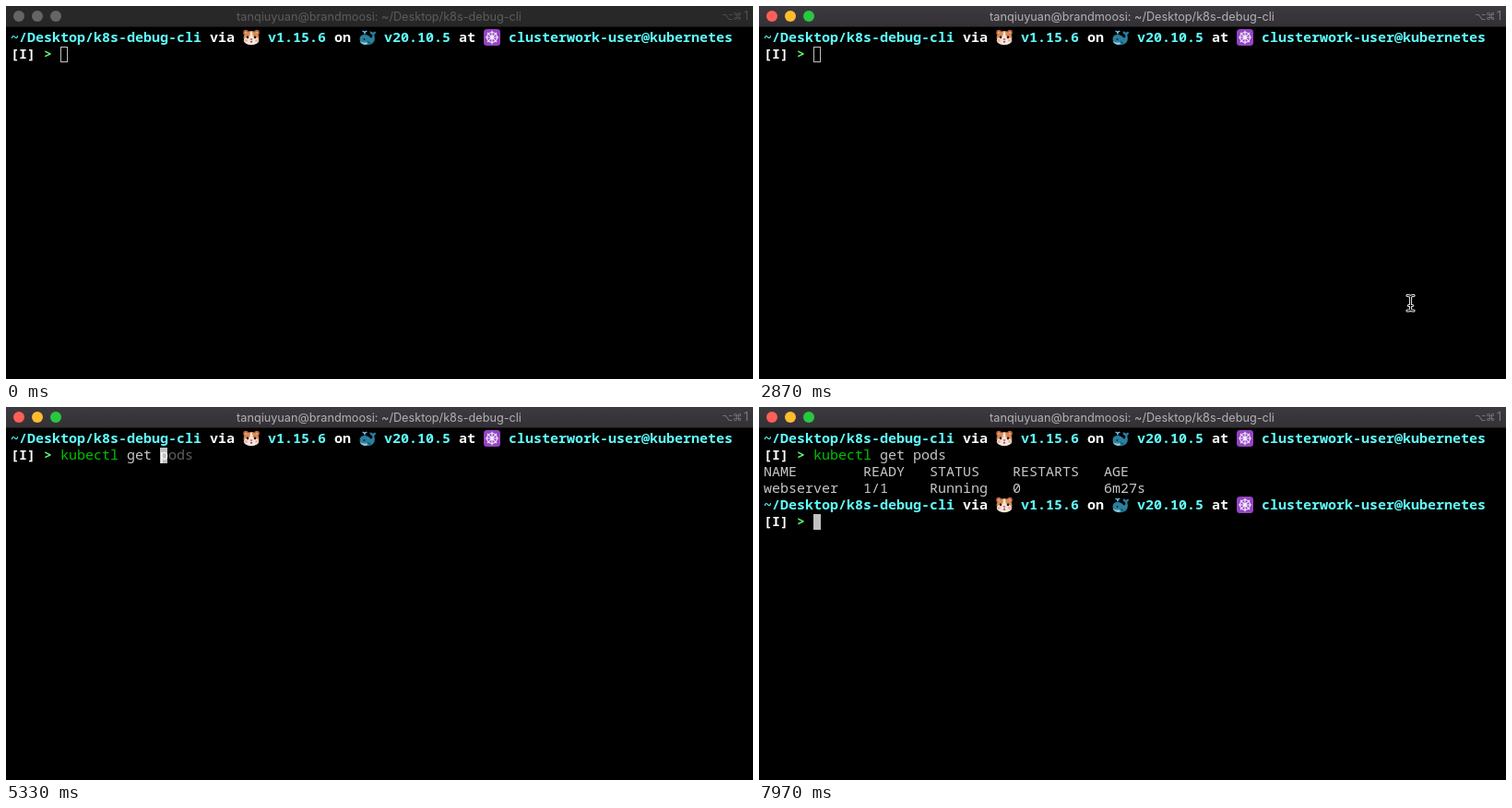
An HTML page with a canvas for the animation above (8 s loop, 810 by 404 pixels).

```html
<!DOCTYPE html>
<html lang="en">
<head>
<meta charset="utf-8">
<title>Terminal</title>
<style>
  html, body { margin: 0; width: 100%; height: 100%; overflow: hidden; background: #000; }
  canvas { display: block; }
</style>
</head>
<body>
<canvas id="stage" width="810" height="404"></canvas>
<script>
const ctx = document.getElementById('stage').getContext('2d');
const LOOP = 8000, CELL = 9, ROW = 18, LEFT = 5;
const MONO = '"Noto Sans Mono", "DejaVu Sans Mono", monospace';
const COLOR = {
  cyan: '#60fdff', white: '#ffffff', lime: '#5ffa68', red: '#ff5c57',
  green: '#00c200', gray: '#c7c7c7', ghost: '#5f5f5f'
};

const COMMAND = 'kubectl get pods';
const KEY_TIMES = [3350, 3950, 4150, 4350, 4560, 4670, 4770, 4880,
                   4980, 5080, 5180, 5290, 5420, 5530, 5640, 5750];
const AT = { focus: 2650, enter: 5960, table: 6250, prompt: 6640, input: 6690 };

// Pointer waypoints: time, x, y
const POINTER = [[500, 640, -20], [820, 742, 317], [1200, 722, 329], [1500, 705.5, 319.5]];

const colX = col => LEFT + col * CELL;

function write(text, col, row, color, bold = false) {
  ctx.font = `${bold ? 'bold' : '500'} 15px ${MONO}`;
  ctx.fillStyle = color;
  ctx.fillText(text, colX(col), 39 + row * ROW);
}

function oval(x, y, rx, ry, color, angle = 0) {
  ctx.fillStyle = color;
  ctx.beginPath();
  ctx.ellipse(x, y, rx, ry, angle, 0, Math.PI * 2);
  ctx.fill();
}

function shape(d, fill, stroke, width = 1) {
  const path = new Path2D(d);
  if (fill) { ctx.fillStyle = fill; ctx.fill(path); }
  if (stroke) { ctx.strokeStyle = stroke; ctx.lineWidth = width; ctx.stroke(path); }
}

// Icons fill an 18 by 18 box
function hamster() {
  for (const side of [-1, 1]) {
    oval(9 + side * 6, 3.8, 2.8, 3, '#b9683c');
    oval(9 + side * 5.8, 4.2, 1.5, 1.8, '#f2a59a');
  }
  oval(9, 9.4, 8.4, 7.4, '#d98a50');
  oval(9, 12.4, 8.2, 4.8, '#f3e6dc');
  oval(9, 7, 1.5, 4.6, '#f3e6dc');
  for (const side of [-1, 1]) {
    oval(9 + side * 4, 8.8, 1.3, 1.5, '#2b1a17');
    oval(9 + side * 5.8, 12.4, 1.8, 1.4, '#f4b0a4');
  }
  oval(9, 11, 1.4, 0.9, '#e0666c');
  oval(9, 13.8, 1.2, 1, '#a64a4e');
}

function whale() {
  shape('M6 5.5Q6 2 3.5 2.5M6 5.5Q6 1.5 8.5 2.5', null, '#6cc7ee', 1.3);
  shape('M.5 11Q.5 6 6 6Q10 6 12.5 9.5Q15 9.5 14 6Q11.5 5.5 11.5 2.5Q14 2 15 4Q16 2 18 3Q18 5.5 16.3 6Q19 17 8 17.2Q.5 17 .5 11Z', '#2a7f9f');
  shape('M.8 13Q4 15.5 9 14Q9 16.8 6.5 17Q2 16.5 .8 13Z', '#93c8da');
  oval(5.5, 11, 0.9, 0.9, '#10242e');
  oval(10.5, 14.5, 2.4, 1.2, '#1b6078', 0.5);
}

function wheel() {
  ctx.fillStyle = '#9544c4';
  ctx.beginPath();
  ctx.roundRect(0, 0, 18, 18, 3.5);
  ctx.fill();
  ctx.strokeStyle = '#f4e9fb';
  ctx.lineWidth = 1.2;
  ctx.beginPath();
  ctx.arc(9, 9, 5.5, 0, Math.PI * 2);
  for (let i = 0; i < 8; i++) {
    const a = i * Math.PI / 4;
    ctx.moveTo(9, 9);
    ctx.lineTo(9 + 7.2 * Math.cos(a), 9 + 7.2 * Math.sin(a));
  }
  ctx.stroke();
  oval(9, 9, 1.6, 1.6, '#f4e9fb');
}

function icon(drawIcon, col, row) {
  ctx.save();
  ctx.translate(colX(col), 25 + row * ROW);
  drawIcon();
  ctx.restore();
}

function promptInfo(row) {
  write('~/Desktop/k8s-debug-cli', 0, row, COLOR.cyan, true);
  write('via', 24, row, COLOR.white, true);
  icon(hamster, 28, row);
  write('v1.15.6', 31, row, COLOR.cyan, true);
  write('on', 39, row, COLOR.white, true);
  icon(whale, 42, row);
  write('v20.10.5', 45, row, COLOR.cyan, true);
  write('at', 54, row, COLOR.white, true);
  icon(wheel, 57, row);
  write('clusterwork-user@kubernetes', 60, row, COLOR.cyan, true);
}

function promptInput(row) {
  write('[I]', 0, row, COLOR.white, true);
  write('>', 4, row, COLOR.lime, true);
}

function cursor(col, row, filled, char = '') {
  const x = colX(col), y = 44 + (row - 1) * ROW;
  if (filled) {
    ctx.fillStyle = '#c1c1c1';
    ctx.fillRect(x, y, 8, 17);
    write(char, col, row, COLOR.white);
  } else {
    ctx.strokeStyle = '#c1c1c1';
    ctx.lineWidth = 1;
    ctx.strokeRect(x + 0.5, y + 0.5, 7, 16);
  }
}

function titleBar(active) {
  const fill = ctx.createLinearGradient(0, 0, 0, 22);
  fill.addColorStop(0, active ? '#3d3a3f' : '#292929');
  fill.addColorStop(1, active ? '#343136' : '#272727');
  ctx.fillStyle = fill;
  ctx.fillRect(0, 0, 810, 22);
  ctx.fillStyle = active ? '#19181a' : '#141414';
  ctx.fillRect(0, 22, 810, 1);

  const lights = active ? ['#ff5f57', '#febc2e', '#28c840'] : Array(3).fill('#656565');
  lights.forEach((color, i) => oval(14 + i * 20, 11, 6, 6, color));

  ctx.fillStyle = active ? '#b3b1b4' : '#5c5c5c';
  ctx.font = '12.7px Inter, Roboto, sans-serif';
  ctx.textAlign = 'center';
  ctx.fillText('tanqiuyuan@brandmoosi: ~/Desktop/k8s-debug-cli', 404.5, 16);
  ctx.textAlign = 'left';

  ctx.fillStyle = active ? '#7b797c' : '#505050';
  ctx.font = '10.5px "DejaVu Sans", sans-serif';
  ctx.fillText('⌥', 776, 15);
  ctx.fillText('⌘', 788, 15);
  ctx.font = '12.7px Inter, Roboto, sans-serif';
  ctx.fillText('1', 800, 15);
}

function commandLine(t) {
  const typed = KEY_TIMES.filter(time => time <= t).length;
  const nameLength = 7;
  if (typed) {
    const complete = typed >= nameLength;
    write(COMMAND.slice(0, Math.min(typed, nameLength)), 6, 1,
          complete ? COLOR.green : COLOR.red, !complete);
    write(COMMAND.slice(nameLength, typed), 6 + nameLength, 1, COLOR.gray);
    write(COMMAND.slice(typed), 6 + typed, 1, COLOR.ghost);
  }
  if (t < AT.enter) cursor(6 + typed, 1, typed > 0, typed ? COMMAND[typed] || '' : '');
}

function output(t) {
  if (t >= AT.table) {
    [['NAME', 'READY', 'STATUS', 'RESTARTS', 'AGE'],
     ['webserver', '1/1', 'Running', '0', '6m27s']].forEach((cells, i) =>
      cells.forEach((cell, j) => write(cell, [0, 12, 20, 30, 41][j], 2 + i, COLOR.gray)));
  }
  if (t >= AT.prompt) promptInfo(4);
  if (t >= AT.input) {
    promptInput(5);
    cursor(6, 5, true);
  } else if (t >= AT.enter) {
    cursor(0, t < AT.table ? 2 : t < AT.prompt ? 4 : 5, true);
  }
}

function pointerAt(t) {
  const next = POINTER.findIndex(point => point[0] > t);
  if (next < 0) return POINTER[POINTER.length - 1].slice(1);
  const [t0, x0, y0] = POINTER[next - 1], [t1, x1, y1] = POINTER[next];
  const p = (t - t0) / (t1 - t0), k = p * p * (3 - 2 * p);
  return [x0 + (x1 - x0) * k, y0 + (y1 - y0) * k];
}

function pointer(t) {
  if (t < POINTER[0][0] || t >= KEY_TIMES[0]) return;
  const [x, y] = pointerAt(t);
  ctx.save();
  ctx.translate(x, y);
  if (t < AT.focus) {
    shape('M.5 .5V15.2L3.8 12.1L6.3 17.6L8.8 16.5L6.4 11.2H10.7Z', '#000', '#e8e8e8', 1.2);
  } else {
    const beam = 'M-2.5 -6Q1 -6 1 -4V9Q1 10.5 -2.5 10.5M4.5 -6Q1 -6 1 -4V9Q1 10.5 4.5 10.5M-1 5H3';
    ctx.lineCap = 'round';
    shape(beam, null, '#e8e8e8', 3.2);
    shape(beam, null, '#000', 1.1);
  }
  ctx.restore();
}

function draw(t) {
  ctx.fillStyle = '#000';
  ctx.fillRect(0, 0, 810, 404);
  titleBar(t >= AT.focus);
  promptInfo(0);
  promptInput(1);
  commandLine(t);
  output(t);
  pointer(t);
}

const start = performance.now();
function tick() {
  draw((performance.now() - start) % LOOP);
  requestAnimationFrame(tick);
}
tick();
</script>
</body>
</html>
```
